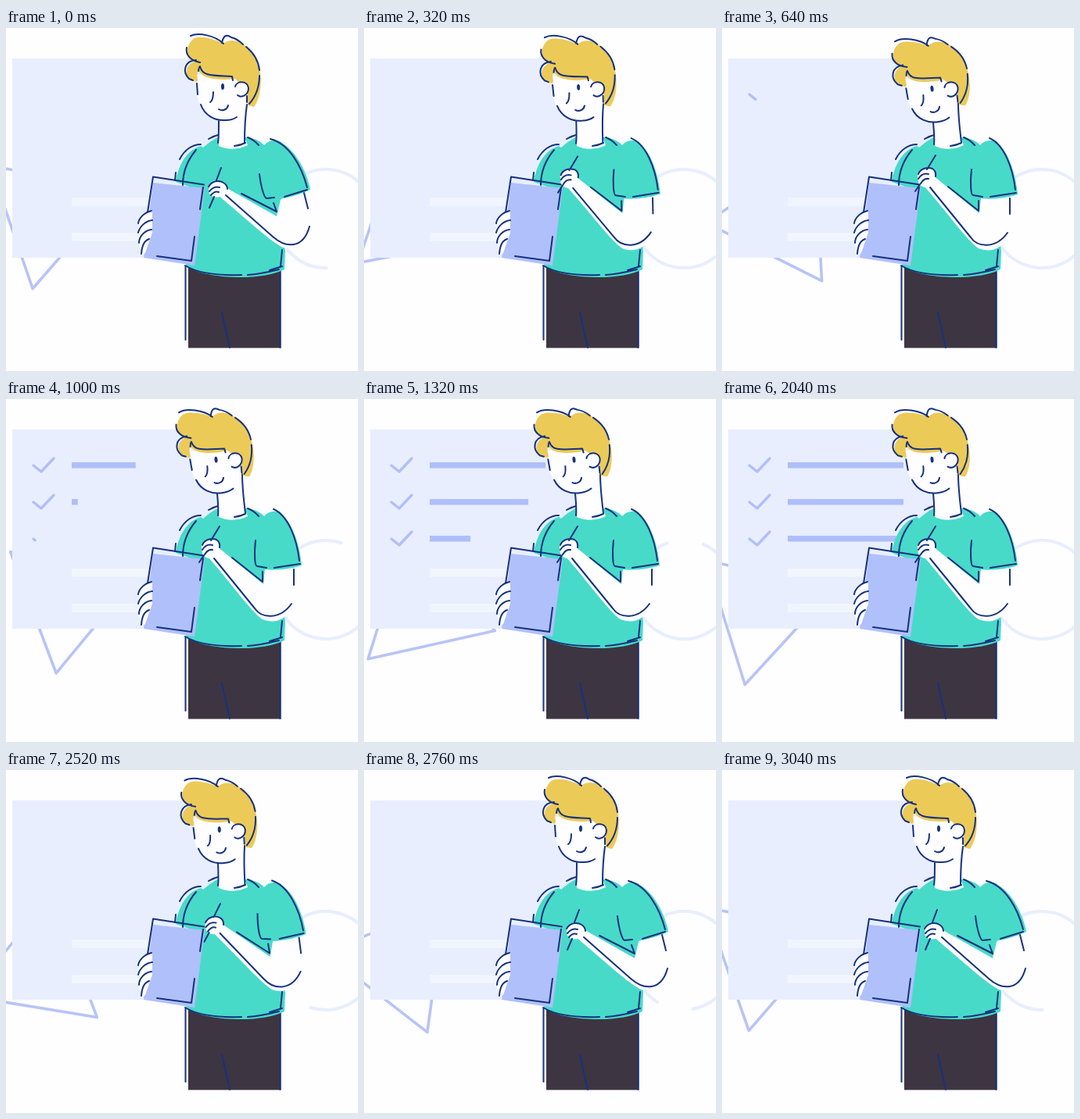
Recreate the animation shown at these times as an HTML page. Size 450 by 439 pixels, loop 3080 ms.

```html
<!DOCTYPE html>
<html lang="en">
<head>
<meta charset="utf-8">
<title>Checklist</title>
<style>
  html, body { margin: 0; width: 100%; height: 100%; overflow: hidden; background: #fefdff; }
  svg { display: block; width: 100vw; height: 100vh; }
  .line { fill: none; stroke: #16327f; stroke-width: 2; stroke-linecap: round; stroke-linejoin: round; }
  .skin { fill: #fefdff; }
  .shirt { fill: #47dac9; }
  .hair { fill: #ecca57; }
  .tick { fill: none; stroke: #b0bffa; stroke-width: 3.4; stroke-linecap: round; stroke-linejoin: round; }
  .bar { fill: #aebefa; }
</style>
</head>
<body>
<svg viewBox="0 0 450 439" preserveAspectRatio="none">
  <circle id="ring" cx="409" cy="244" r="63" pathLength="360" stroke-dasharray="320 40"
    fill="none" stroke="#e7eefe" stroke-width="4"/>
  <path id="tri" d="M34.3 333.6L-20.4 176.2L142.9 207.9Z" fill="none" stroke="#b7c4f6"
    stroke-width="3.6" stroke-linejoin="round"/>

  <path d="M8 39H272V294H8Z" fill="#e8eefe"/>
  <path d="M84 217H232V228H84ZM84 262H232V273H84Z" fill="#f1f5fe"/>
  <g id="list"></g>

  <!-- trousers and shirt -->
  <path d="M233 306H351.500V409.500H233Z" fill="#3d3541"/>
  <path class="line" d="M229.500 305V399M350.500 310V409M276 364L286 409"/>
  <path class="shirt" d="M252 153C260 146 267 141 274 139L307 140C318 141 326 145 330 150C336 143 345 142 352 146
    L350 200L355 270L357 285L356 309C330 323 260 323 230 305L240 205L217 197C220 178 229 157 249 151Z"/>
  <path class="line" d="M226 201C226 185 232 169 243 156M216 195L217 185M222 168C228 156 238 149 249 149
    M259 142Q266 138 274 136M309 140Q317 143 323 150
    M229 304C245 314 270 317 301 316M309 316C325 315 341 311 349 309M337 310L353 305M353 284L351 305"/>

  <!-- neck -->
  <path class="skin" data-by="head" d="M272 110L309 88L305 140L309 150C298 156 282 156 272 151Z"
    data-to="M270 112L301 86L305 140L309 150C298 156 282 156 272 151Z"/>
  <path class="line" data-by="head" d="M272 119C272 132 272 142 271 147M308 98C306 112 305 130 305 147"
    data-to="M270 121C271 132 272 142 271 149M302 96C302 112 304 130 306 146"/>
  <path class="line" d="M292 151Q300 150 306 147"/>

  <g id="head">
    <path class="skin" d="M244 60V85C248 105 262 119 280 118C295 117 306 105 309 90L300 60Z"/>
    <path class="hair" d="M246 55C242 60 247 65 244 69L238 67C229 63 227 50 240 43C228 38 230 20 241 13
      C252 9 270 16 278 20C292 8 315 24 322 45C328 62 327 88 317 101L309 99L309 74L298 70L293 65
      C278 67 259 66 251 60Z"/>
    <circle class="skin" cx="302" cy="78" r="8"/>
    <path class="line" d="M236 10C246 5 268 10 278 20M276 19C278 9 282 8 288 12Q296 14 303 21M307 24C318 33 323 44 324 54
      M324 61C324 77 319 88 311 97M231 25C229 34 236 42 248 44M243 41C228 42 225 56 234 65L239 67
      M246 55Q247 49 248 49Q250 57 257 59C268 62 278 61 289 62L290 67"/>
    <path class="line" d="M293 75C295 67 309 67 310 77C310 86 301 90 296 86M244 71L245 85M249 98C254 112 267 119 281 118
      Q289 118 295 114M265 82C265 88 264 93 261 95M272 104C277 107 283 104 284 99M308 87L308 95"/>
    <ellipse cx="277" cy="75" rx="2" ry="3.900" fill="#16327f"/>
  </g>

  <!-- clipboard and the hand holding it -->
  <path d="M188 198L254 205L241 304L176 294Z" fill="#b0c0fa"/>
  <path class="line" d="M181 236L188 190.500L253 200.500M252 204L248 232M241 267L237 298L193 292"/>
  <path class="skin" d="M187 234C176 236 170 244 170 252C168 262 169 276 173 291L178 288L187 262Z"/>
  <path class="line" d="M186 234C177 236 170 243 169 250M187 246C178 247 171 254 169 262M186 258C177 259 170 267 170 275
    M183 270Q174 273 173 289"/>

  <!-- drawing arm -->
  <path class="skin" data-by="arm"
    d="M274 199L286 207L346 241L351 220L384 210L388 250C382 278 368 284 354 281C338 273 308 245 271 214Z"
    data-to="M264 184L275 193L329 237L331 218L370 216L368 262C360 284 342 288 328 282C315 274 288 236 259 203Z"/>
  <path class="shirt" data-by="arm"
    d="M325 165L345 144C368 150 385 184 389 207C372 215 350 220 332 221Z"
    data-to="M322 165L343 144C364 148 375 184 378 213C360 219 340 220 320 217Z"/>
  <path class="line" data-by="arm"
    d="M338 142C362 148 378 177 385 204M324 187C326 204 330 217 333 218L343 217M356 216L385 207"
    data-to="M342 141C361 149 372 180 375 207M319 181C317 198 318 214 321 214L333 216M343 216L376 211"/>
  <path class="line" data-by="arm"
    d="M301 212L346 235L342 224M381 211L386 231M281 214L341 267C358 282 380 283 388 254"
    data-to="M289 203L328 234L328 221M368 218L368 238M266 204L318 268C327 281 350 283 365 262"/>
  <path class="skin" data-by="arm"
    d="M259 207C261 198 268 194 277 197Q283 201 283 211L273 216Q264 218 260 212Z"
    data-to="M250 189C251 181 259 177 268 180Q275 184 273 197L262 204Q254 204 251 198Z"/>
  <path class="line" data-by="arm"
    d="M259 203C263 196 272 194 278 198Q283 201 283 206M260 209Q266 202 273 204M262 214Q267 208 272 210M275 179L269 195M266 216L260 230"
    data-to="M251 187C254 179 263 178 269 180Q274 183 273 190M251 193Q256 185 264 187M254 199Q258 192 264 193M273 163L262 181M253 200L247 209"/>
</svg>
<script>
const LOOP = 3080, TURN = 3040;
const $ = id => document.getElementById(id);

const ramp = (t, from, to) => Math.min(1, Math.max(0, (t - from) / (to - from)));
const ease = x => x < .5 ? 4 * x ** 3 : 1 - 4 * (1 - x) ** 3;
const swing = (t, a, b, c, d) => ease(ramp(t, a, b)) - ease(ramp(t, c, d));

const nums = s => s.match(/-?[\d.]+/g).map(Number);
const morphs = [...document.querySelectorAll('[data-to]')].map(el => {
  const d = el.getAttribute('d');
  return { el, d, a: nums(d), b: nums(el.dataset.to), by: el.dataset.by };
});

function morph({ el, d, a, b }, k) {
  let i = 0;
  el.setAttribute('d', d.replace(/-?[\d.]+/g, () => {
    const v = a[i] + (b[i] - a[i]) * k;
    i++;
    return v.toFixed(2);
  }));
}

function add(name, attrs) {
  const el = document.createElementNS('http://www.w3.org/2000/svg', name);
  for (const key in attrs) el.setAttribute(key, attrs[key]);
  return $('list').appendChild(el);
}

const rows = [0, 1, 2].map(i => {
  const y = 85 + 47 * i;
  return {
    start: 585 + 200 * i,
    tick: add('path', { class: 'tick', d: `M35 ${y}L45 ${y + 8}L61 ${y - 9}`, pathLength: 100 }),
    bar: add('rect', { class: 'bar', x: 84, y: y - 4, height: 7.5 })
  };
});

function draw(t) {
  const turn = 360 * ramp(t, 0, TURN);
  $('tri').setAttribute('transform', `rotate(${turn} 61 256)`);
  $('ring').setAttribute('transform', `rotate(${88 - turn} 409 244)`);

  const pose = {
    arm: swing(t, 0, 440, 2280, 2760),
    head: swing(t, 60, 660, 2250, 2790)
  };
  morphs.forEach(m => morph(m, pose[m.by]));
  const k = pose.head;
  $('head').setAttribute('transform', `rotate(${-6 * k} 284 158) translate(0 ${1.5 * k})`);

  for (const { start, tick, bar } of rows) {
    const drawn = ramp(t, start, start + 200);
    tick.style.visibility = drawn ? 'visible' : 'hidden';
    tick.setAttribute('stroke-dasharray', `${100 * drawn} 200`);
    bar.setAttribute('width', 148 * ramp(t, start + 195, start + 595));
  }
  $('list').setAttribute('opacity', 1 - ramp(t, 2240, 2400));
}

const begin = performance.now();
function tick() {
  draw((performance.now() - begin) % LOOP);
  requestAnimationFrame(tick);
}
tick();
</script>
</body>
</html>
```
